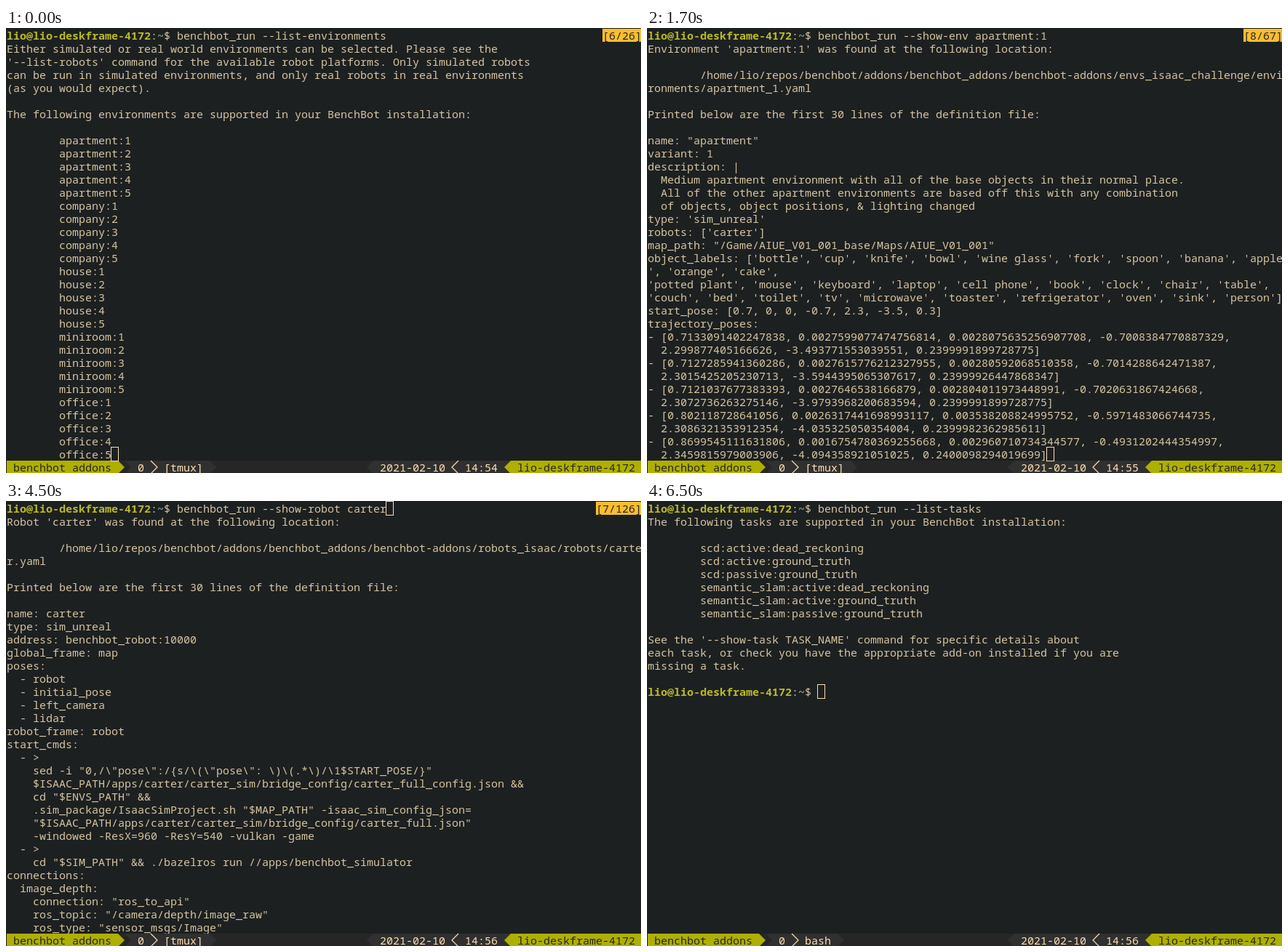
These frames come from a looping animation (873 px wide and 612 px high, 8 s). An HTML page with a canvas:

```html
<!DOCTYPE html>
<html lang="en">
<head>
<meta charset="utf-8">
<title>Terminal session</title>
<style>
  html, body { margin: 0; width: 100%; height: 100%; overflow: hidden; background: #1d2021; }
  canvas { display: block; }
</style>
</head>
<body>
<canvas id="term" width="873" height="612"></canvas>
<script>
const ctx = document.getElementById('term').getContext('2d');
const CW = 9, CH = 18, COLS = 97, STATUS_ROW = 33, LOOP = 8000;
const FONT = '15px "Noto Sans Mono", "DejaVu Sans Mono", monospace';
const USER = 'lio', HOST = 'lio-deskframe-4172';
const PROMPT = `${USER}@${HOST}`;
const C = {
  bg: '#1d2021', fg: '#d5c4a1', prompt: '#b8bb26', dir: '#83a598',
  badge: '#fabd2f', dark: '#262626', seg: '#303030', olive: '#afaf00', light: '#ffdfaf'
};

const ADDONS = `        /home/${USER}/repos/benchbot/addons/benchbot_addons/benchbot-addons/`;
const numbered = name => [1, 2, 3, 4, 5].map(n => `        ${name}:${n}`).join('\n');

// Lines starting with "$ " are shell prompts; cursor is [row, column].
const screens = [
  {
    start: 0, clock: '14:54', win: '[tmux]', badge: '[6/26]', cursor: [32, 16],
    text: `$ benchbot_run --list-environments
Either simulated or real world environments can be selected. Please see the
'--list-robots' command for the available robot platforms. Only simulated robots
can be run in simulated environments, and only real robots in real environments
(as you would expect).

The following environments are supported in your BenchBot installation:

${['apartment', 'company', 'house', 'miniroom', 'office'].map(numbered).join('\n')}`
  },
  {
    start: 500, clock: '14:55', win: '[tmux]', badge: '[8/67]', cursor: [32, 61],
    text: `$ benchbot_run --show-env apartment:1
Environment 'apartment:1' was found at the following location:

${ADDONS}envs_isaac_challenge/environments/apartment_1.yaml

Printed below are the first 30 lines of the definition file:

name: "apartment"
variant: 1
description: |
  Medium apartment environment with all of the base objects in their normal place.
  All of the other apartment environments are based off this with any combination
  of objects, object positions, & lighting changed
type: 'sim_unreal'
robots: ['carter']
map_path: "/Game/AIUE_V01_001_base/Maps/AIUE_V01_001"
object_labels: ['bottle', 'cup', 'knife', 'bowl', 'wine glass', 'fork', 'spoon', 'banana', 'apple', 'orange', 'cake',
'potted plant', 'mouse', 'keyboard', 'laptop', 'cell phone', 'book', 'clock', 'chair', 'table',
'couch', 'bed', 'toilet', 'tv', 'microwave', 'toaster', 'refrigerator', 'oven', 'sink', 'person']
start_pose: [0.7, 0, 0, -0.7, 2.3, -3.5, 0.3]
trajectory_poses:
- [0.7133091402247838, 0.0027599077474756814, 0.0028075635256907708, -0.7008384770887329,
  2.299877405166626, -3.493771553039551, 0.2399991899728775]
- [0.7127285941360286, 0.0027615776212327955, 0.00280592068510358, -0.7014288642471387,
  2.3015425205230713, -3.5944395065307617, 0.23999926447868347]
- [0.7121037677383393, 0.0027646538166879, 0.002804011973448991, -0.7020631867424668,
  2.3072736263275146, -3.9793968200683594, 0.2399991899728775]
- [0.802118728641056, 0.0026317441698993117, 0.003538208824995752, -0.5971483066744735,
  2.3086321353912354, -4.035325050354004, 0.2399982362985611]
- [0.8699545111631806, 0.0016754780369255668, 0.002960710734344577, -0.4931202444354997,
  2.3459815979003906, -4.094358921051025, 0.2400098294019699]`
  },
  {
    start: 2500, clock: '14:55', win: 'bash', cursor: [9, 26],
    text: `$ benchbot_run --list-robots
The following robot targets are supported in your BenchBot installation:

        carter

See the '--show-robot ROBOT_NAME' command for specific details about
each robot, or check you have the appropriate add-on installed if you are
missing a robot.

$ `
  },
  {
    start: 4500, clock: '14:56', win: '[tmux]', badge: '[7/126]', cursor: [0, 58],
    text: String.raw`$ benchbot_run --show-robot carter
Robot 'carter' was found at the following location:

${ADDONS}robots_isaac/robots/carter.yaml

Printed below are the first 30 lines of the definition file:

name: carter
type: sim_unreal
address: benchbot_robot:10000
global_frame: map
poses:
  - robot
  - initial_pose
  - left_camera
  - lidar
robot_frame: robot
start_cmds:
  - >
    sed -i "0,/\"pose\":/{s/\(\"pose\": \)\(.*\)/\1$START_POSE/}"
    $ISAAC_PATH/apps/carter/carter_sim/bridge_config/carter_full_config.json &&
    cd "$ENVS_PATH" &&
    .sim_package/IsaacSimProject.sh "$MAP_PATH" -isaac_sim_config_json=
    "$ISAAC_PATH/apps/carter/carter_sim/bridge_config/carter_full.json"
    -windowed -ResX=960 -ResY=540 -vulkan -game
  - >
    cd "$SIM_PATH" && ./bazelros run //apps/benchbot_simulator
connections:
  image_depth:
    connection: "ros_to_api"
    ros_topic: "/camera/depth/image_raw"
    ros_type: "sensor_msgs/Image"`
  },
  {
    start: 6500, clock: '14:56', win: 'bash', cursor: [14, 26],
    text: `$ benchbot_run --list-tasks
The following tasks are supported in your BenchBot installation:

        scd:active:dead_reckoning
        scd:active:ground_truth
        scd:passive:ground_truth
        semantic_slam:active:dead_reckoning
        semantic_slam:active:ground_truth
        semantic_slam:passive:ground_truth

See the '--show-task TASK_NAME' command for specific details about
each task, or check you have the appropriate add-on installed if you are
missing a task.

$ `
  }
];

const colX = col => 1 + col * CW;
const rowY = row => 1 + row * CH;

function put(str, row, col, color = C.fg, bold = false) {
  ctx.font = (bold ? 'bold ' : '') + FONT;
  ctx.fillStyle = color;
  ctx.fillText(str, colX(col), rowY(row) + 15);
}

function fillCells(row, col, count, color) {
  ctx.fillStyle = color;
  ctx.fillRect(colX(col), rowY(row), count * CW, CH);
}

// One-cell chevron in the status row; dir 1 points right, -1 left.
function chevron(col, dir, color, solid = true) {
  const base = colX(dir > 0 ? col : col + 1), top = rowY(STATUS_ROW);
  ctx.beginPath();
  ctx.moveTo(base, top);
  ctx.lineTo(base + dir * CW, top + CH / 2);
  ctx.lineTo(base, top + CH);
  if (solid) {
    ctx.fillStyle = color;
    ctx.fill();
  } else {
    ctx.strokeStyle = color;
    ctx.lineWidth = 1.2;
    ctx.stroke();
  }
}

function drawLine(line, row) {
  if (!line.startsWith('$ ')) return put(line, row, 0);
  const end = PROMPT.length;
  put(PROMPT, row, 0, C.prompt, true);
  put(':', row, end);
  put('~', row, end + 1, C.dir, true);
  put(line, row, end + 2);
}

function drawStatus({ clock, win }) {
  const r = STATUS_ROW, winEnd = 25 + win.length;
  fillCells(r, 0, COLS, C.dark);
  fillCells(r, 0, 17, C.olive);
  chevron(17, 1, C.olive);
  fillCells(r, 18, winEnd - 18, C.seg);
  chevron(18, 1, C.dark);
  chevron(winEnd, 1, C.seg);
  chevron(55, -1, C.seg);
  fillCells(r, 56, 21, C.seg);
  chevron(76, -1, C.olive);
  fillCells(r, 77, 20, C.olive);

  put('benchbot addons', r, 1, C.dark);
  put('0', r, 20, C.light);
  chevron(22, 1, C.light, false);
  put(win, r, 24, C.light);
  put('2021-02-10', r, 57, C.light);
  chevron(68, -1, C.light, false);
  put(clock, r, 70, C.light);
  put(HOST, r, 78, C.dark);
}

function draw(screen) {
  ctx.fillStyle = C.bg;
  ctx.fillRect(0, 0, 873, 612);
  const wrap = line => line.match(new RegExp(`.{1,${COLS}}`, 'g')) || [''];
  screen.text.split('\n').flatMap(wrap).forEach(drawLine);
  if (screen.badge) {
    const col = COLS - screen.badge.length;
    fillCells(0, col, screen.badge.length, C.badge);
    put(screen.badge, 0, col, C.dark);
  }
  drawStatus(screen);
  const [row, col] = screen.cursor;
  ctx.strokeStyle = C.light;
  ctx.lineWidth = 1;
  ctx.strokeRect(colX(col) - 0.5, rowY(row) - 0.5, CW + 1, CH + 1);
}

const origin = performance.now();
function tick() {
  const t = (performance.now() - origin) % LOOP;
  draw(screens.findLast(s => s.start <= t) || screens[0]);
  requestAnimationFrame(tick);
}
tick();
</script>
</body>
</html>
```
